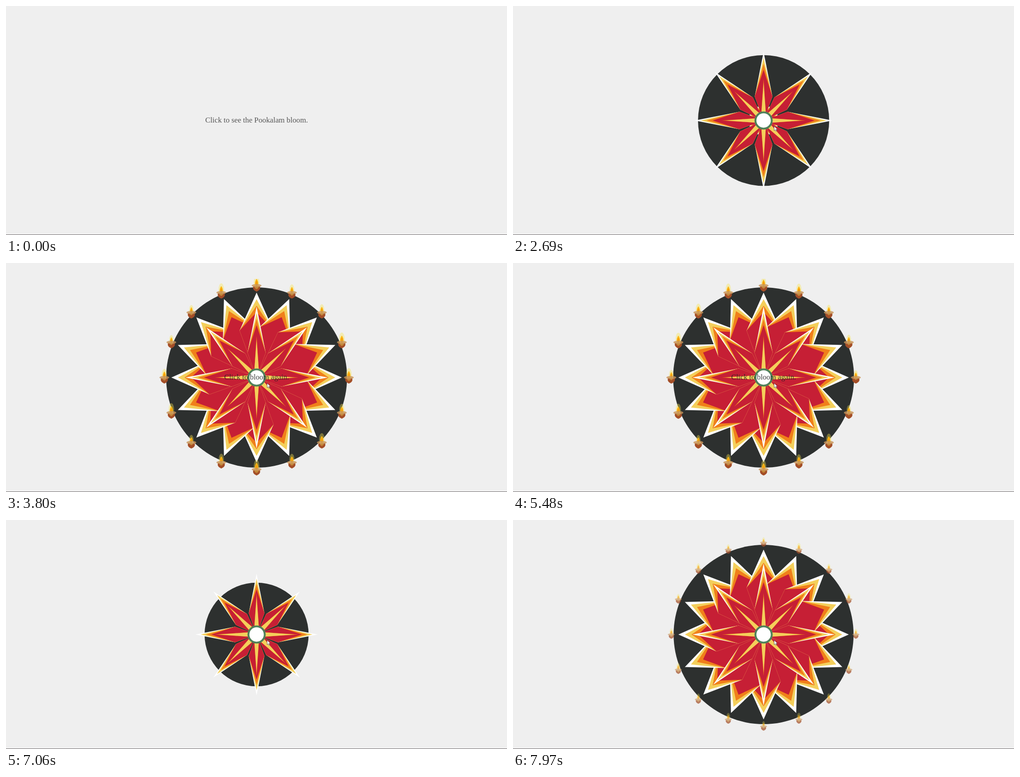
An HTML page for the animation above (8 s loop, 1105x507 px).

```html
<!DOCTYPE html>
<html lang="en">
<head>
<meta charset="utf-8">
<title>Pookalam</title>
<style>
  html, body { margin: 0; width: 100%; height: 100%; overflow: hidden; background: #efefef; }
  svg { display: block; position: absolute; left: 0; top: 0; }
  text { font-family: "Liberation Serif", serif; text-anchor: middle; }
</style>
</head>
<body>
<svg id="stage" width="1105" height="507" viewBox="0 0 1105 507">
  <defs>
    <clipPath id="frame"><rect x="334" y="35" width="437" height="437"/></clipPath>
  </defs>
  <rect width="1105" height="507" fill="#efefef"/>
  <rect y="506" width="1105" height="1" fill="#6a6668"/>
  <text id="intro" x="552.7" y="258" font-size="16.8" fill="#555">Click to see the Pookalam bloom.</text>
  <g clip-path="url(#frame)">
    <g id="flower" transform="translate(552.7 253.5)">
      <circle id="disc" fill="#2d302f"/>
      <g id="back"></g>
      <g id="front"></g>
      <g id="rays"></g>
      <g id="ring">
        <circle r="18" fill="#fff" stroke="#50805a" stroke-width="4.2"/>
      </g>
      <g id="lamps"></g>
    </g>
  </g>
  <text id="again" x="552.7" y="258" font-size="16.5" fill="#222" fill-opacity=".85">Click to bloom again.</text>
  <path id="cursor" d="M0 0V10L2.3 7.9L3.9 11.4L5.5 10.7L4 7.3H7.1Z"
        fill="#fff" stroke="#444" stroke-width=".7" stroke-linejoin="round"/>
</svg>
<script>
const LOOP = 8000;
const STARTS = [1215, 5745];
const CURSOR_IN = 320;
const FLICKER = 62;
const LAMPS = 16;
const LAMP_R = 203.5;

const WHITE = '#fff', YELLOW = '#f4cf5b', ORANGE = '#f07f1a', RED = '#c61f35';

const $ = id => document.getElementById(id);
const intro = $('intro'), again = $('again'), flower = $('flower'), disc = $('disc');
const back = $('back'), front = $('front'), rays = $('rays'), ring = $('ring'), cursor = $('cursor');

const clamp = v => Math.max(0, Math.min(1, v));
const inOut = x => x < .5 ? 4 * x ** 3 : 1 - 4 * (1 - x) ** 3;
const grow = (t, delay, span) => inOut(clamp((t - delay) / span));
const scale = (el, k) => el.setAttribute('transform', `scale(${k})`);
const show = (el, on) => el.setAttribute('visibility', on ? 'visible' : 'hidden');
const noise = (a, b) => {
  const v = Math.sin(a * 12.9898 + b * 78.233) * 43758.5453;
  return v - Math.floor(v);
};

// Nested kites that share side corners and differ only in their tips.
function petals(group, count, along, half, layers) {
  let html = '';
  for (let i = 0; i < count; i++) {
    const kites = layers.map(([tip, fill]) =>
      `<path d="M0 0L${along} ${-half}L${tip} 0L${along} ${half}Z" fill="${fill}"/>`).join('');
    html += `<g transform="rotate(${i * 360 / count})">${kites}</g>`;
  }
  group.innerHTML = html;
}

petals(back, 16, 104, 37.4, [[188, WHITE], [173.5, YELLOW], [159, ORANGE], [144.5, RED]]);
petals(front, 8, 55, 20, [[157, WHITE], [143.5, YELLOW], [130, ORANGE], [116, RED]]);
petals(rays, 8, 15, 5, [[99, RED], [92, ORANGE], [84, YELLOW]]);

const LAMP = `
  <path d="M-7 1C-9 6 -8 10 0 13.5C8 10 9 6 7 1Z" fill="#a44e27"/>
  <g class="flame">
    <ellipse cy="-7" rx="6.5" ry="15" fill="#f8e650" fill-opacity=".38"/>
    <path d="M0 -15.5C2.6 -12 3.8 -8 3.8 -5C3.8 -1 2 1.5 0 1.5C-2 1.5 -3.8 -1 -3.8 -5C-3.8 -8 -2.6 -12 0 -15.5Z" fill="#fdb913"/>
    <ellipse cy="-5" rx="2" ry="5" fill="#f59c0f"/>
  </g>
  <ellipse rx="11" ry="3.6" fill="#c8955a" fill-opacity=".8"/>`;

const lamps = Array.from({ length: LAMPS }, (_, i) => {
  const a = i * 2 * Math.PI / LAMPS;
  const el = document.createElementNS('http://www.w3.org/2000/svg', 'g');
  el.innerHTML = LAMP;
  $('lamps').append(el);
  return { el, flame: el.querySelector('.flame'), x: LAMP_R * Math.cos(a), y: LAMP_R * Math.sin(a) };
});

function drawLamps(k, t) {
  const step = Math.floor(t / FLICKER);
  lamps.forEach(({ el, flame, x, y }, i) => {
    el.setAttribute('transform', `translate(${x} ${y}) scale(${k})`);
    el.setAttribute('opacity', k);
    scale(flame, .72 + .28 * noise(i + 1, step + 1));
  });
}

function drawCursor(t) {
  const a = clamp((t - CURSOR_IN) / 270), b = inOut(clamp((t - 790) / 400));
  const e = 1 - (1 - a) ** 2;
  const x = 992 - 267 * e - 149 * b;
  const y = 490 - 140 * e - 84 * b;
  cursor.setAttribute('transform', `translate(${x} ${y})`);
  show(cursor, t >= CURSOR_IN);
}

function draw(t) {
  const start = t < STARTS[1] ? STARTS[0] : STARTS[1];
  const age = t - start;
  const first = start === STARTS[0];
  show(flower, age > 0);
  show(again, age >= 2500);
  intro.setAttribute('opacity', first ? 1 - grow(age, 0, 750) : 0);
  disc.setAttribute('r', 199.5 * grow(age, 0, 2500));
  scale(rays, grow(age, 0, 1250));
  scale(front, grow(age, 476, 1250));
  scale(back, grow(age, 1030, 1250));
  scale(ring, grow(age, 0, 800));
  drawLamps(grow(age, 1500, 1250), t);
  drawCursor(t);
}

const begin = performance.now();
function tick() {
  draw((performance.now() - begin) % LOOP);
  requestAnimationFrame(tick);
}
tick();
</script>
</body>
</html>
```
